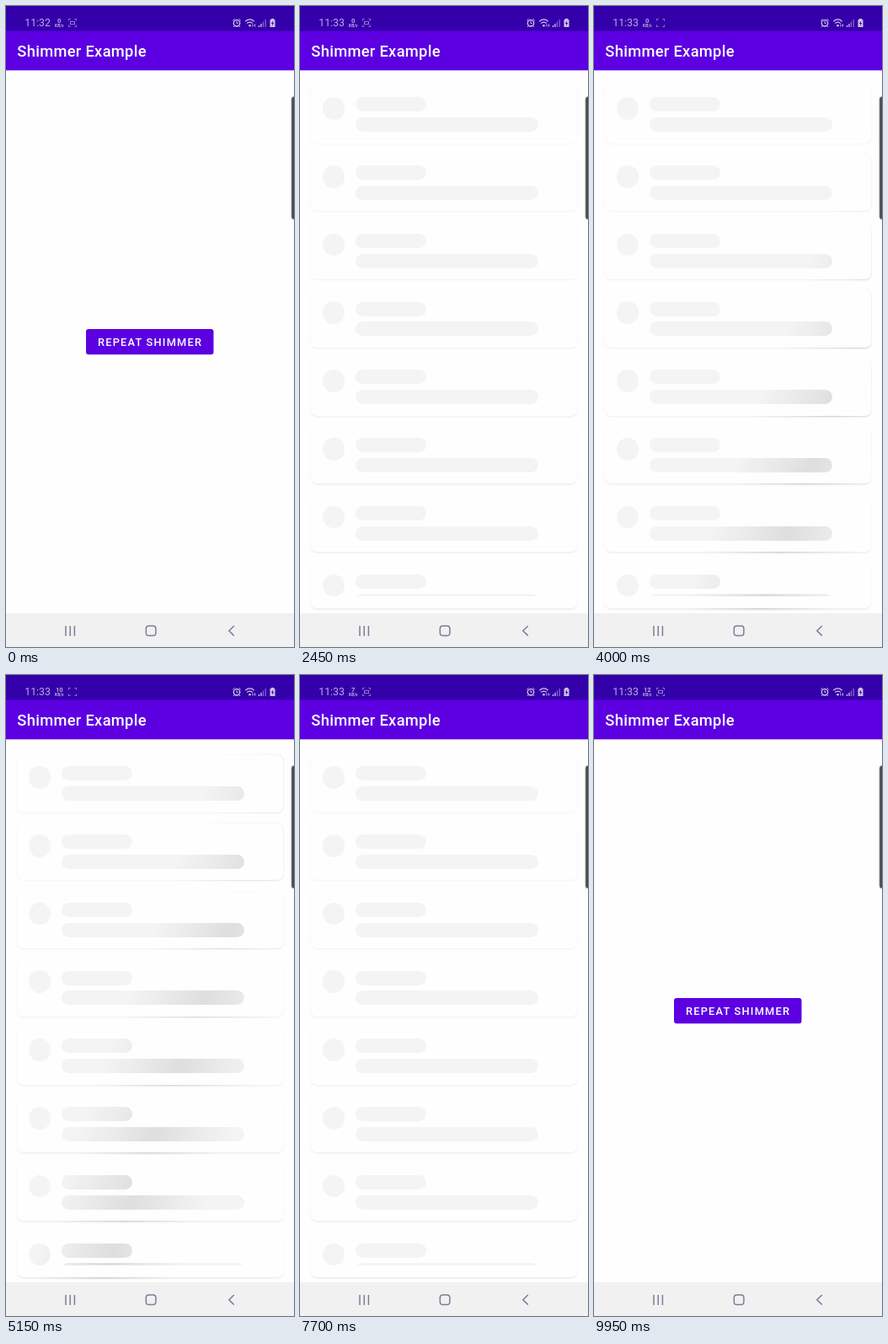
Write an HTML page that moves like this. It is 342 px wide and 760 px high and loops after 10000 ms.

```html
<!DOCTYPE html>
<html lang="en">
<head>
<meta charset="utf-8">
<title>Shimmer Example</title>
<style>
  html, body { margin: 0; width: 100%; height: 100%; overflow: hidden; background: #fefefe; }
  #stage { position: relative; width: 342px; height: 760px; overflow: hidden; background: #fefefe; }
  #list {
    position: absolute; left: 0; top: 76px; width: 342px; height: 644px; --shift: 0px;
    --band: linear-gradient(110deg,
      rgba(0,0,0,.3) calc(50% + var(--shift) - 85.5px),
      #000 calc(50% + var(--shift)),
      rgba(0,0,0,.3) calc(50% + var(--shift) + 85.5px));
    -webkit-mask-image: var(--band);
    mask-image: var(--band);
  }
  .card { position: absolute; left: 13px; width: 316px; border-radius: 7px; background: #fefefe; }
  .clip { position: absolute; inset: 0 0 13.5px; overflow: hidden; }
  .clip i { position: absolute; background: #dedede; border-radius: 14px; }
  .dot { left: 13.5px; top: 13.2px; width: 26.6px; height: 26.6px; }
  .name { left: 53px; top: 13.3px; width: 84px; height: 17px; }
  .line { left: 53px; top: 37px; width: 217px; height: 17px; }
  svg { position: absolute; left: 0; top: 0; }
  text { font-family: Roboto, sans-serif; }
  .bold { font-weight: 500; fill: #fff; }
</style>
</head>
<body>
<div id="stage">
  <div id="list"></div>
  <svg width="342" height="760" viewBox="0 0 342 760">
    <rect y="29" width="342" height="47.3" fill="#5c00e2"/>
    <rect width="342" height="29.5" fill="#3400aa"/>
    <text class="bold" x="13.3" y="59.8" font-size="18.3" letter-spacing=".33">Shimmer Example</text>

    <g fill="#bda9e4">
      <text id="clock" x="22.3" y="24.3" font-size="12.3">11:32</text>
      <text id="speed" x="63.3" y="20.3" font-size="7.6" font-weight="700" text-anchor="middle">0</text>
      <text x="63.3" y="25.3" font-size="4.8" font-weight="700" text-anchor="middle">KB/s</text>
    </g>
    <g fill="none" stroke="#a08ad4" stroke-width=".9">
      <path d="M74.5 17.5v-2h2M81.500 15.500h2v2M83.500 22.500v2h-2M76.500 24.500h-2v-2"/>
      <rect id="rec" x="76.500" y="18.300" width="5" height="3.400"/>
    </g>
    <g fill="none" stroke="#d3c5ee">
      <circle cx="274" cy="20.300" r="3.700" stroke-width="1.300"/>
      <path d="M274 18v2.500h1.600M269.300 17.300l2.200-2M278.700 17.300l-2.200-2M271.300 23.500l-1.300 1.500M276.700 23.500l1.300 1.500"/>
      <path d="M284.300 18.200q5.200-4.600 10.400 0M286.200 20.500q3.300-2.800 6.600 0" stroke-width="1.200"/>
      <path d="M293 21.500v3M295.500 21.500v3"/>
      <path d="M300.500 25v-2M303 25v-4" stroke-width="1.300"/>
      <path d="M305.500 25v-6.500M308.200 25v-9" stroke-width="1.300" opacity=".5"/>
    </g>
    <g fill="#d3c5ee">
      <circle cx="289.500" cy="23.300" r="1.300"/>
      <path d="M314.800 15h3.400v1.200h1.300v8.800h-6v-8.800h1.300z"/>
      <path d="M317.300 17l-2.400 4h1.500l-.6 3 2.500-4h-1.600z" fill="#3400aa"/>
    </g>

    <g id="button">
      <rect x="95" y="383" width="151.500" height="30.300" rx="3.300" fill="#5c00e2"/>
      <text class="bold" x="109" y="402.800" font-size="12.800" letter-spacing="1.220">REPEAT SHIMMER</text>
    </g>

    <rect x="339" y="107.500" width="10" height="145.500" rx="3" fill="#4b4b4d" stroke="#a0a0a2" stroke-width=".8"/>
    <rect y="720" width="342" height="40" fill="#f1f1f1"/>
    <g fill="none" stroke="#817a98" stroke-width="1.500">
      <path d="M71 735v12M76.200 735v12M81.400 735v12"/>
      <rect x="166.300" y="735" width="11.600" height="11.600" rx="3.300"/>
      <path d="M270.800 735l-6 5.800 6 5.800"/>
    </g>
  </svg>
</div>
<script>
const LOOP = 10000, SHOW = 650, HIDE = 8650, SWEEP = 596;
const W = 342, H = 644, TILT = 20 * Math.PI / 180;
const REACH = W + Math.tan(TILT) * H;
const SPEEDS = [[0, '0'], [5000, '10'], [7000, '7'], [9000, '12']];
const $ = id => document.getElementById(id);
const list = $('list');

for (let i = 0; i < 8; i++) {
  const card = document.createElement('div');
  const drop = 0.3 + i * 0.22;
  card.className = 'card';
  card.style.top = 19 + i * 80.76 + 'px';
  card.style.height = (i < 7 ? 67.5 : 53.4) + 'px';
  card.style.boxShadow = `0 ${drop}px 2px rgba(0,0,0,.2)`;
  card.innerHTML = '<div class="clip"><i class="dot"></i><i class="name"></i><i class="line"></i></div>';
  list.append(card);
}

function show(el, on) {
  el.style.visibility = on ? 'visible' : 'hidden';
}

function setText(id, value) {
  if ($(id).textContent !== value) $(id).textContent = value;
}

function draw(t) {
  const loading = t >= SHOW && t < HIDE;
  show(list, loading);
  show($('button'), !loading);
  if (loading) {
    const phase = (t - SHOW) % SWEEP / SWEEP;
    const shift = (2 * phase - 1) * REACH * Math.cos(TILT);
    list.style.setProperty('--shift', shift.toFixed(2) + 'px');
  }
  setText('clock', t < 1800 ? '11:32' : '11:33');
  setText('speed', SPEEDS.filter(s => t >= s[0]).pop()[1]);
  show($('rec'), t < 3200 || t >= 7000);
}

const start = performance.now();
function tick() {
  draw((performance.now() - start) % LOOP);
  requestAnimationFrame(tick);
}
tick();
</script>
</body>
</html>
```
